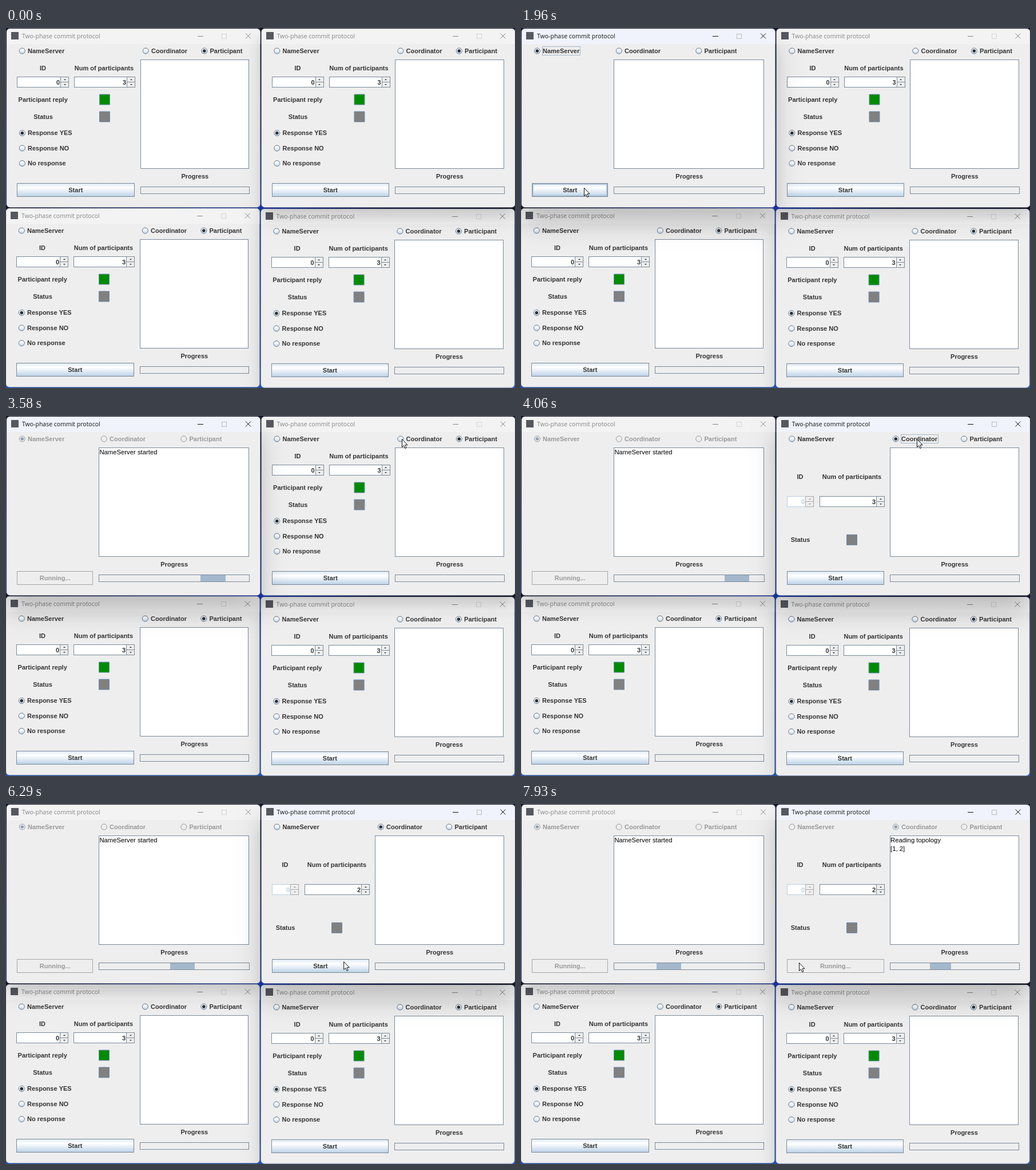
Write an HTML page with a canvas that moves like this. It is 890x629 px and loops after 8000 ms.

```html
<!DOCTYPE html>
<html>
<head>
<meta charset="utf-8">
<title>Two-phase commit protocol</title>
<style>
html, body { margin: 0; width: 100%; height: 100%; overflow: hidden; background: #14182a; }
canvas { display: block; }
</style>
</head>
<body>
<canvas id="stage" width="890" height="629"></canvas>
<script>
const ctx = document.getElementById('stage').getContext('2d');
const LOOP = 8000, FIRST = 150, STEP = 67.05;
const LINE = '#7a8a99', INK = '#333', OFF = '#999', PALE = '#b8cfe5', STEEL = '#a3b8cc';
const BOLD = 'bold 11px "Liberation Sans", Arial, sans-serif';
const PLAIN = '11.3px "Liberation Sans", Arial, sans-serif';
const TITLE = '10.5px "Open Sans", "Noto Sans", sans-serif';

const CLICK = { server: 1220, startServer: 2030, coordinator: 4000, spinner: 5340, startCoordinator: 7330 };
const RELEASE = 60;

// Pointer moves: start, end, x, y
const ENTER = { x: 757, y: 568 };
const MOVES = [
  [150, 890, 29, 44],      // name server radio
  [1290, 1960, 110, 279],  // its start button
  [2290, 2690, 599, 230],
  [2690, 3100, 724, 60],
  [3100, 3500, 692, 40],   // coordinator radio
  [4130, 5200, 633, 156],  // spinner
  [5610, 6350, 588, 281],  // start button
  [7400, 7930, 486, 277]
];
const ORIGINS = [[0, 0], [445.5, 0], [-1, 314], [444.6, 315]];

let ox = 0, oy = 0;   // origin of the window being drawn
const px = x => Math.round(x + ox), py = y => Math.round(y + oy);
const within = (t, a, b) => t >= a && t < b;
const clamp = k => Math.max(0, Math.min(1, k));
const ease = k => k * k * (3 - 2 * k);

// The screen refreshes at a steady rate
const stepped = t => FIRST + Math.floor((t - FIRST) / STEP + .3) * STEP;

function gradient(x0, y0, x1, y1, ...colors) {
  const g = ctx.createLinearGradient(x0, y0, x1, y1);
  colors.forEach((c, i) => g.addColorStop(i / (colors.length - 1), c));
  return g;
}

const gloss = (y, h) => gradient(0, y + oy, 0, y + oy + h, '#dde8f3', '#fff', '#dde8f3', PALE);

function fill(x, y, w, h, color) {
  ctx.fillStyle = color;
  ctx.fillRect(px(x), py(y), px(x + w) - px(x), h);
}

function box(x, y, w, h, color, line = LINE) {
  if (color) fill(x, y, w, h, color);
  ctx.strokeStyle = line;
  ctx.lineWidth = 1;
  ctx.strokeRect(px(x) + .5, py(y) + .5, px(x + w) - px(x) - 1, h - 1);
}

function text(s, x, y, align = 'left', color = INK, font = BOLD) {
  ctx.font = font;
  ctx.fillStyle = color;
  ctx.textAlign = align;
  ctx.fillText(s, x + ox, Math.floor(y + oy));
}

function disc(x, y, r, color) {
  ctx.beginPath();
  ctx.arc(x, y, r, 0, 7);
  ctx.fillStyle = color;
  ctx.fill();
}

function radio(x, y, label, on, disabled, ring) {
  const cx = x + ox + .3, cy = y + oy;
  disc(cx, cy, 5, disabled ? '#eee' : gloss(y - 5, 10));
  ctx.strokeStyle = disabled ? OFF : '#65788a';
  ctx.lineWidth = 1;
  ctx.stroke();
  if (on) disc(cx, cy, 2.8, disabled ? '#8ba0b8' : '#2b2f33');
  text(label, x + 10, y + 4, 'left', disabled ? OFF : INK);
  if (ring) box(x + 9, y - 8, ctx.measureText(label).width + 3, 16, null, STEEL);
}

function arrow(x, y, d, color) {
  ctx.beginPath();
  ctx.moveTo(x - 2, y - d);
  ctx.lineTo(x + 2, y - d);
  ctx.lineTo(x, y + d);
  ctx.fillStyle = color;
  ctx.fill();
}

function spinner(x, y, w, value, disabled, caret) {
  box(x, y, w - 14, 19, '#fff', disabled ? PALE : LINE);
  text(value, x + w - 16, y + 14, 'right', disabled ? PALE : INK);
  if (caret) fill(x + w - 23, y + 3, 1, 13, '#000');
  for (const d of [-1, 1]) {
    const top = d < 0 ? y : y + 9;
    box(x + w - 15, top, 15, 10, '#eee', disabled ? '#aaa' : LINE);
    arrow(px(x + w - 7.5), py(top + 5), d, disabled ? OFF : INK);
  }
}

function swatch(cx, cy, color) {
  ctx.beginPath();
  ctx.rect(cx + ox - 9, cy + oy - 9, 18, 18);
  ctx.fillStyle = color;
  ctx.fill();
  ctx.strokeStyle = '#6d8bb0';
  ctx.lineWidth = 1;
  ctx.stroke();
}

function frame(active) {
  const x = ox + 1, y = oy + 1;
  ctx.save();
  ctx.shadowColor = `rgba(0,0,0,${active ? .22 : .18})`;
  ctx.shadowBlur = active ? 42 : 28;
  ctx.shadowOffsetY = active ? 28 : 18;
  ctx.beginPath();
  ctx.roundRect(x, y, 443.6, 312.5, 6);
  ctx.fillStyle = '#eee';
  ctx.fill();
  ctx.restore();
  ctx.save();
  ctx.clip();
  ctx.fillStyle = active ? '#f0f3fb' : '#f3f3f3';
  ctx.fillRect(x, y, 444, 27);
  ctx.restore();
  ctx.strokeStyle = 'rgba(90,95,110,.3)';
  ctx.lineWidth = 1;
  ctx.stroke();

  fill(9, 7, 13, 13, '#55585e');
  const ink = active ? '#111' : '#858585';
  text('Two-phase commit protocol', 28, 18, 'left', ink, TITLE);
  fill(335, 14, 10, 1, ink);
  box(377, 10, 9, 9, null, active ? '#bbb' : '#d4d4d4');
  const cx = ox + 423.5, cy = oy + 14;
  ctx.beginPath();
  for (const d of [-4.5, 4.5]) {
    ctx.moveTo(cx - d, cy - 4.5);
    ctx.lineTo(cx + d, cy + 4.5);
  }
  ctx.strokeStyle = ink;
  ctx.stroke();
}

function startButton(w, s) {
  const mid = 19 + w / 2;
  if (s.running) {
    box(19, 271, w, 24, '#eee', '#a5a5a5');
    text('Running...', mid, 287, 'center', OFF);
    return;
  }
  box(19, 271, w, 24, s.pressed ? STEEL : gloss(271, 24));
  if (s.hover) {
    box(20, 272, w - 2, 22, null, STEEL);
    box(21, 273, w - 4, 20, null, PALE);
  }
  text('Start', mid, 287, 'center');
}

function progress(left, phase) {
  const w = 426 - left;
  text('Progress', (left + 426) / 2, 263.5, 'center');
  box(left, 277, w, 13, '#eee');
  if (phase === undefined) return;
  const p = (Math.max(0, phase) / 1500) % 2, at = p > 1 ? 2 - p : p;
  const inner = w - 2, block = inner / 6;
  fill(left + 1 + at * (inner - block), 278, block, 11, STEEL);
}

function participantForm() {
  text('ID', 64.5, 74, 'center');
  text('Num of participants', 171.5, 74, 'center');
  spinner(19, 85, 91, '0');
  spinner(119, 85, 107, '3');
  text('Participant reply', 64.7, 129, 'center');
  swatch(172.5, 125, '#008c00');
  text('Status', 65, 159, 'center');
  swatch(172.5, 155, '#808080');
  ['Response YES', 'Response NO', 'No response'].forEach((s, i) => radio(28, 183.5 + i * 26.5, s, !i));
}

function coordinatorForm(s) {
  text('ID', 42.5, 110.5, 'center');
  text('Num of participants', 133, 110.5, 'center');
  spinner(19, 140, 47.5, '0', true);
  spinner(76, 140, 114.5, s.count, false, s.caret);
  text('Status', 43, 220.5, 'center');
  swatch(133, 216.3, '#808080');
}

function drawWindow(i, s) {
  [ox, oy] = ORIGINS[i];
  frame(s.active);
  const mode = s.mode || 'Participant';
  const [left, x2, x3] = { NameServer: [162.4, 171, 310.5], Coordinator: [199.6, 209.5, 329],
    Participant: [234.6, 244, 346.5] }[mode];
  [['NameServer', 28], ['Coordinator', x2], ['Participant', x3]].forEach(([name, x]) =>
    radio(x, 40, name, mode === name, s.running, s.ring === name));
  if (mode === 'Participant') participantForm();
  if (mode === 'Coordinator') coordinatorForm(s);
  box(left, 55, 425 - left, 191, '#fff');
  (s.log || []).forEach((row, n) => text(row, left + 1, 67.5 + n * 14.6, 'left', '#000', PLAIN));
  startButton(left - 29, s);
  progress(left, s.phase);
}

function pointer(t, now) {
  if (now < FIRST) return;
  let { x, y } = ENTER;
  for (const [a, b, toX, toY] of MOVES) {
    const k = ease(clamp((t - a) / (b - a)));
    x += (toX - x) * k;
    y += (toY - y) * k;
  }
  const glow = Object.values(CLICK).some(c => within(now, c, c + RELEASE + 20) && (now - c < RELEASE || c !== CLICK.coordinator));
  if (glow) disc(x - 1, y - 1.5, 10.5, 'rgba(242,232,30,.75)');
  ctx.save();
  ctx.translate(x, y);
  ctx.beginPath();
  [[.5, .5], [.5, 14.5], [3.6, 11.6], [5.8, 16.6], [8, 15.6], [5.9, 10.8], [10, 10.6]]
    .forEach(p => ctx.lineTo(...p));
  ctx.closePath();
  ctx.fillStyle = '#fff';
  ctx.fill();
  ctx.strokeStyle = '#111';
  ctx.lineWidth = 1;
  ctx.stroke();
  ctx.restore();
}

function desktop() {
  ctx.fillStyle = gradient(0, 0, 0, 629, '#14182a', '#1c2f78', '#1c3fc0', '#2350c0', '#2a62c8');
  ctx.fillRect(0, 0, 890, 629);
  ctx.fillStyle = gradient(0, 0, 890, 0, '#14182a', '#173084', '#1c3fc0', '#15204c', '#14182a');
  ctx.fillRect(0, 310, 890, 9);
}

function draw(now) {
  const t = stepped(now);
  const run1 = now >= 2355, run2 = now >= CLICK.startCoordinator + RELEASE;
  const server = {
    active: within(now, CLICK.server, CLICK.coordinator),
    mode: now >= CLICK.server + RELEASE && 'NameServer',
    ring: within(now, CLICK.server, CLICK.startServer) && 'NameServer',
    hover: within(now, 1880, 2360),
    pressed: within(now, CLICK.startServer, CLICK.startServer + RELEASE),
    running: run1,
    log: run1 ? ['NameServer started'] : [],
    phase: run1 ? 351 + .982 * (t - 2690) : undefined
  };
  const coordinator = {
    active: now >= CLICK.coordinator,
    mode: now >= CLICK.coordinator + RELEASE && 'Coordinator',
    ring: within(now, CLICK.coordinator, CLICK.spinner) && 'Coordinator',
    count: now < CLICK.spinner + 130 ? '3' : '2',
    caret: within(now, CLICK.spinner, CLICK.startCoordinator) && (now - CLICK.spinner) % 1000 < 500,
    hover: now >= 6300,
    pressed: within(now, CLICK.startCoordinator, CLICK.startCoordinator + RELEASE),
    running: run2,
    log: run2 ? ['Reading topology', '[1, 2]'].slice(0, now < 7520 ? 1 : 2) : [],
    phase: run2 ? .982 * (t - 7367) : undefined
  };
  const states = [server, coordinator, {}, {}];
  const order = server.active ? [2, 3, 1, 0] : coordinator.active ? [2, 3, 0, 1] : [0, 2, 3, 1];
  desktop();
  order.forEach(i => drawWindow(i, states[i]));
  pointer(t, now);
}

function tick() {
  draw(performance.now() % LOOP);
  requestAnimationFrame(tick);
}
tick();
</script>
</body>
</html>
```
